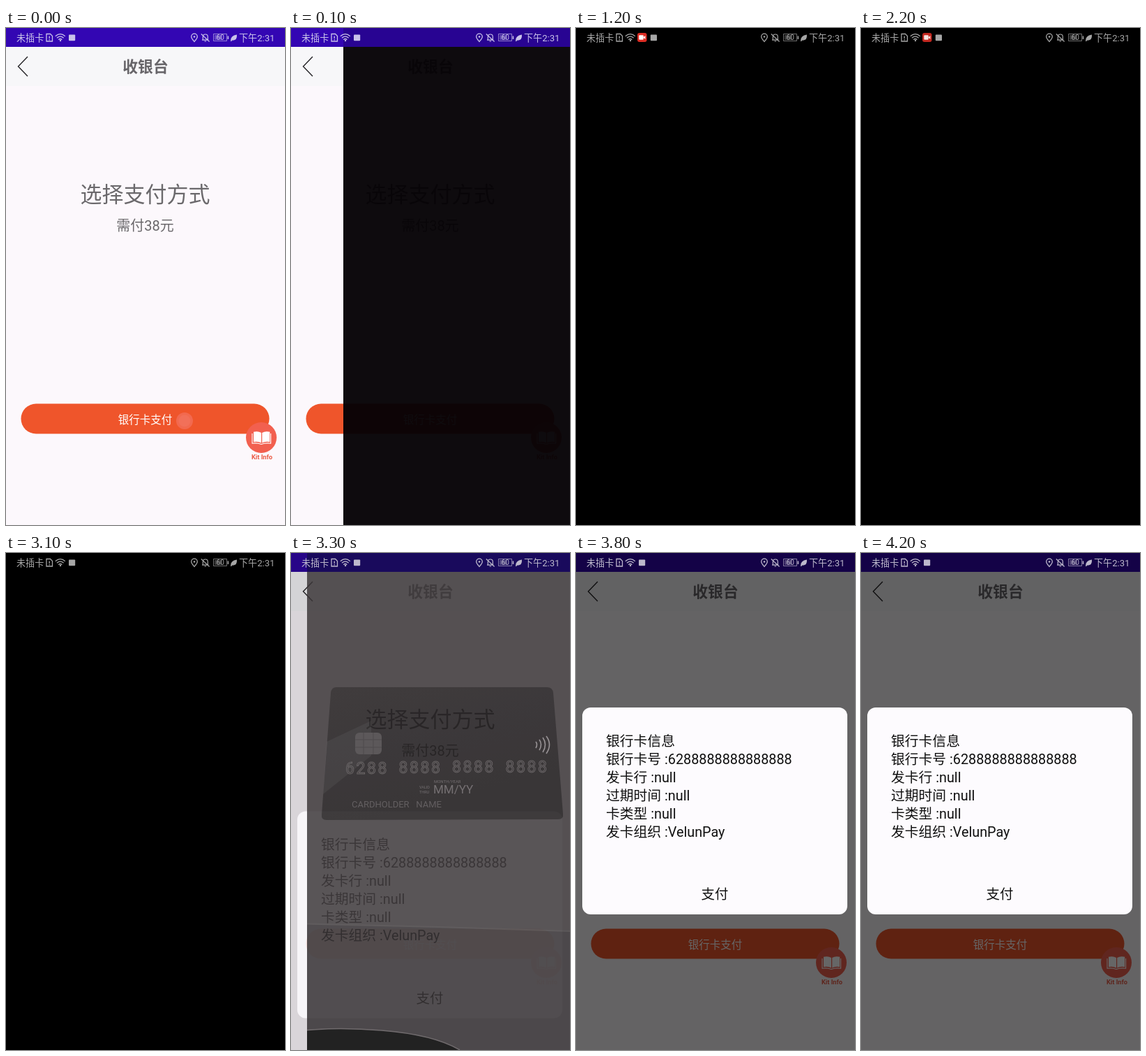
An HTML page with a canvas that plays this animation: 400x711 px, repeating every 4.3 s.

```html
<!DOCTYPE html>
<html lang="zh-CN">
<head>
<meta charset="utf-8">
<title>收银台</title>
<style>
html, body { margin: 0; width: 100%; height: 100%; overflow: hidden; background: #000; }
canvas { display: block; width: 100vw; height: 100vh; }
</style>
</head>
<body>
<canvas id="stage" width="400" height="711"></canvas>
<script>
const W = 400, H = 711, BAR = 27, LOOP = 4300, TICK = 100;
const SANS = "Roboto, 'Noto Sans CJK SC', 'Noto Sans CJK JP', sans-serif";
const INFO = ['银行卡信息', '银行卡号 :6288888888888888', '发卡行 :null',
  '过期时间 :null', '卡类型 :null', '发卡组织 :VelunPay'];
const stage = document.getElementById('stage').getContext('2d');
let g = stage;

function rect(x, y, w, h, fill) {
  g.fillStyle = fill;
  g.fillRect(x, y, w, h);
}

function round(x, y, w, h, r, fill) {
  g.beginPath();
  g.roundRect(x, y, w, h, r);
  g.fillStyle = fill;
  g.fill();
}

function disc(x, y, r, fill) {
  g.beginPath();
  g.arc(x, y, r, 0, Math.PI * 2);
  g.fillStyle = fill;
  g.fill();
}

function stroke(d, color, width) {
  g.strokeStyle = color;
  g.lineWidth = width;
  g.stroke(new Path2D(d));
}

function fill(d, color) {
  g.fillStyle = color;
  g.fill(new Path2D(d));
}

function text(s, x, y, size, color, align = 'left', weight = 400) {
  g.font = `${weight} ${size}px ${SANS}`;
  g.textAlign = align;
  g.fillStyle = color;
  g.fillText(s, x, y);
}

function layer(alpha, draw) {
  g.save();
  g.globalAlpha *= alpha;
  draw();
  g.restore();
}

// Draws once into its own canvas, so that it can be faded as one piece.
function picture(draw) {
  const canvas = document.createElement('canvas');
  canvas.width = W;
  canvas.height = H;
  g = canvas.getContext('2d');
  draw();
  g = stage;
  return canvas;
}

function statusIcons(color, recording, pulse) {
  text('未插卡', 15, 18.6, 13.1, color);
  stroke('M58 8.5h5.5l3 3v7.5h-8.5z M62.2 11.5v3.5 M62.2 16v1.4', color, 1.3);
  stroke('M70.8 11.8q7-6.4 14 0 M73 14.3q4.8-4.4 9.6 0 M75.3 16.7q2.5-2.4 5 0', color, 1.3);
  disc(78, 18, 1.2, color);
  if (recording) {
    layer(pulse, () => {
      round(88, 7, 13.5, 13, 3, '#dc2c23');
      round(90.3, 10.3, 6.4, 6.4, 1, '#fff');
      fill('M96.2 13.5l3.2-2.6v5.2z', '#fff');
    });
  }
  round(recording ? 106.8 : 90, 9.5, 9.2, 8.8, 1, color);

  stroke('M270 19.5c-2.6-3-4.3-4.8-4.3-7a4.3 4.3 0 0 1 8.6 0c0 2.2-1.7 4-4.3 7z', color, 1.3);
  disc(270, 12.5, 1.3, color);
  stroke('M281 17.2h9.3 M282.3 17v-4.5q0-3.5 3.5-3.5t3.5 3.5v4.5 M284.5 19h2.6 M279.8 8.5l11.8 11', color, 1.2);
  layer(0.65, () => stroke('M297.5 8.5h19v10h-19z', color, 1));
  layer(0.35, () => rect(299, 10, 10.5, 7, color));
  rect(317.6, 11.5, 1.6, 4.5, color);
  text('60', 307.2, 17.2, 10, color, 'center');
  fill('M322 18.8q-.3-8 9-9.2q.7 8.6-6.6 8l-1.6 1.7z', color);
  text('下午2:31', 334, 18.6, 13.1, color);
}

function book(x, y) {
  fill(`M${x} ${y - 7}q-5-3-11-1.2v14.4q6-1.5 11 1.4z`, '#fff');
  fill(`M${x + 1.2} ${y - 7}q5-3 11-1.2v14.4q-6-1.5-11 1.4z`, '#fff');
  stroke(`M${x - 13} ${y - 6}v14.2q7-1 13 1.2q6-2.2 13.6-1.2v-14.2`, '#fff', 1.1);
}

function page(touched) {
  rect(0, 0, W, H, '#fcf8fc');
  rect(0, BAR, W, 56, '#f7f7f9');
  text('收银台', W / 2, 63.2, 21.8, '#676569', 'center', 700);
  text('选择支付方式', 199.5, 249, 31, '#6b696c', 'center');
  text('需付38元', 199.5, 290, 20, '#6b696c', 'center');
  round(21.5, 537.5, 356, 43, 21.5, '#ef552b');
  text('银行卡支付', 199.5, 565.8, 15.5, '#fff', 'center');
  if (touched) {
    disc(256, 562, 12, '#f2694f');
    disc(256, 562, 8.5, '#f27059');
  }
  disc(366, 586, 22, '#f2604f');
  book(366, 586);
  text('Kit Info', 367, 616.5, 9.2, '#ea5a44', 'center', 700);
  stroke('M31 41L17.5 55L31 69', '#252427', 1.4);
}

function dialog(top) {
  round(9, top, 380, 296, 12, '#fdfbfe');
  INFO.forEach((s, i) => text(s, 43, top + 54.5 + i * 26, 19.8, '#111'));
  text('支付', 199, top + 274, 19.4, '#111', 'center');
}

function bankCard() {
  const shade = g.createLinearGradient(60, 192, 110, 382);
  shade.addColorStop(0, '#231f20');
  shade.addColorStop(1, '#1b1819');
  fill('M65 192H367Q375 192 376 200L390 373Q391 381 383 381L51 382Q43 382 44 374L57 200Q58 192 65 192z', shade);
  fill('M51 270L115 240V290L46 345z', 'rgba(255,255,255,.05)');

  round(92, 257, 38, 31, 6, '#454142');
  stroke('M92 267h12v-10 M92 278h12v10 M130 267h-12v-10 M130 278h-12v10 M104 267h14v11h-14z', '#353132', 1);
  stroke('M351 270q3 4 0 9 M356 267q5 7 0 15 M361 264q7 10 0 21 M366 262q9 12 0 25', '#8c8789', 1.6);

  g.font = '400 23px ' + SANS;
  g.letterSpacing = '2.6px';
  g.textAlign = 'left';
  g.lineWidth = 1;
  g.strokeStyle = '#575253';
  ['6288', '8888', '8888', '8888'].forEach((s, i) => {
    g.strokeText(s, 78 + i * 76.5, 316 - i * 0.8);
  });
  g.letterSpacing = '0px';
  text('MONTH/YEAR', 205, 329, 6, '#625d5f');
  text('VALID', 184, 337, 5.5, '#625d5f');
  text('THRU', 184, 344, 5.5, '#625d5f');
  text('MM/YY', 204, 344, 17, '#625d5f');
  text('CARDHOLDER   NAME', 87, 364, 13, '#4d494a');
}

const camera = picture(() => {
  rect(0, BAR, W, H - BAR, '#3c3739');
  fill('M0 530Q200 534 400 541V711H0z', '#322e30');
  stroke('M0 530Q200 534 400 541', '#444041', 2);
  bankCard();
  fill('M0 685Q60 677 130 683Q205 689 242 711H0z', '#000');
  stroke('M0 685Q60 677 130 683Q205 689 242 711', '#5c5759', 1.5);
});

// Covers the page from x to the right edge, below the status bar.
function cover(x, alpha, draw) {
  layer(alpha, () => {
    g.beginPath();
    g.rect(x, BAR, W - x, H - BAR);
    g.clip();
    draw();
  });
}

function statusBar(color, x = 0) {
  rect(x, 0, W - x, BAR, color);
}

function opening(t) {
  page(t < 100);
  statusBar('#3306b3');
  if (t >= 100) {
    statusBar('#280492', 75);
    cover(75, 0.96, () => rect(0, 0, W, H, '#050205'));
  }
  statusIcons('#c9c2ea', false);
}

function scanning(t) {
  rect(0, 0, W, H, '#000');
  const recording = t >= 500 && t < 3100;
  const pulse = t < 1200 ? 1 : 0.92 + 0.08 * Math.cos((t - 1200) / 600 * Math.PI * 2);
  statusIcons('#a6a6a6', recording, pulse);
}

function closing() {
  page(false);
  rect(0, BAR, W, H - BAR, 'rgba(0,0,0,.14)');
  layer(0.85, () => dialog(369.5));
  cover(23, 0.84, () => g.drawImage(camera, 0, 0));
  statusBar('#270588');
  statusBar('#190a5c', 23);
  statusIcons('#bdb9cc', false);
}

function result() {
  page(false);
  statusBar('#3306b3');
  rect(0, 0, W, H, 'rgba(0,0,0,.6)');
  dialog(221);
  statusIcons('#bdb9cc', false);
}

function draw(t) {
  if (t < 200) opening(t);
  else if (t < 3300) scanning(t);
  else if (t < 3400) closing();
  else result();
}

const start = performance.now();
function frame() {
  const t = Math.max(0, performance.now() - start) % LOOP;
  draw(Math.floor(t / TICK) * TICK);
  requestAnimationFrame(frame);
}
frame();
</script>
</body>
</html>
```
